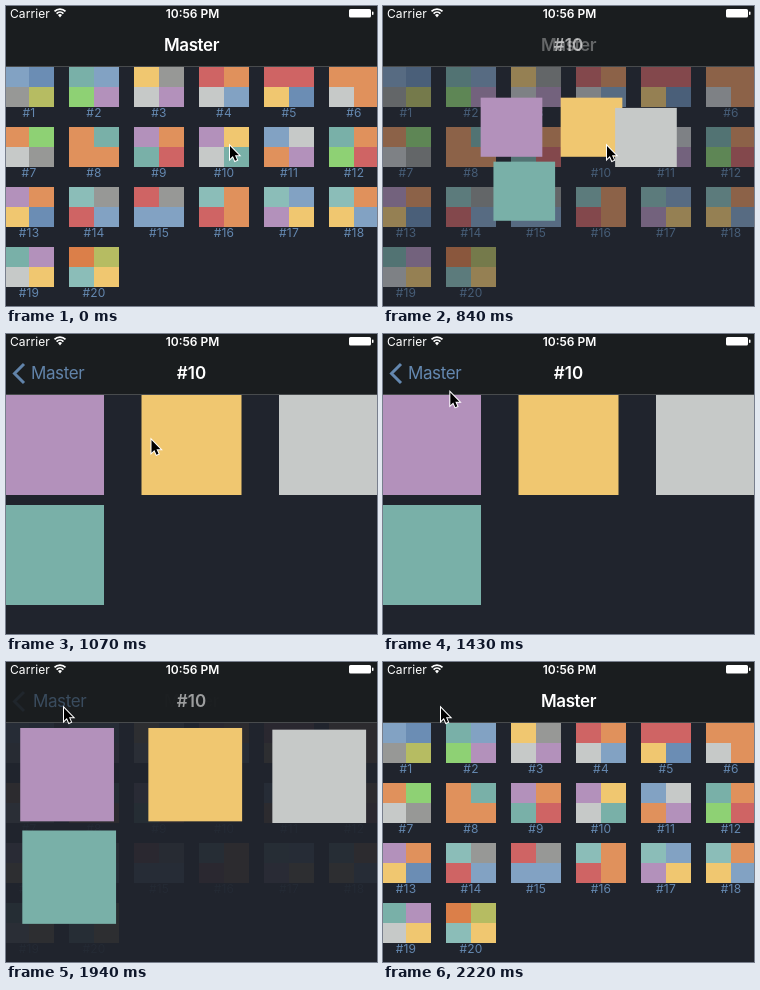
Animation of 371x300 px, one loop 2.94 s. Source, as an HTML page with a canvas:

```html
<!DOCTYPE html>
<html lang="en">
<head>
<meta charset="utf-8">
<title>Grid to detail transition</title>
<style>
html, body { margin: 0; width: 100%; height: 100%; overflow: hidden; background: #20242d; }
canvas { display: block; }
</style>
</head>
<body>
<canvas id="stage" width="371" height="300"></canvas>
<script>
const ctx = document.getElementById('stage').getContext('2d');
const FONT = 'Inter, "Liberation Sans", sans-serif';
const LINK = '#6488b0';
const LOOP = 2940, PUSH = 720, PRESS = 1710, POP = 1890, DONE = 2220;

const COLORS = {
  b: '#82a2c3', B: '#6b8db4', k: '#979896', l: '#b6bc62', t: '#79b0a8',
  T: '#8bbdb8', g: '#8ed174', p: '#b391bb', y: '#f0c770', r: '#cf6464',
  o: '#e0915c', O: '#db7f49', w: '#c6c9c8'
};
// Four tiles per cell: top left, top right, bottom left, bottom right.
const CELLS = ('bBkl tbgp ykwp rowb rryB oowo ogwk otoo potr pywt ' +
  'bwop togr poyB Tkrb rkbb Toro Tbpy Toyb tpwy OlTy').split(' ');
const OPEN = 9;

const mix = (a, b, p) => a + (b - a) * p;
const ramp = (t, from, to) => Math.min(1, Math.max(0, (t - from) / (to - from)));
const smooth = x => x * x * (3 - 2 * x);
// 0 on the grid, 1 on the detail page.
const opened = t => smooth(ramp(t, 708, 978)) - smooth(ramp(t, 1880, 2224));

function rect(color, x, y, w, h) {
  ctx.fillStyle = color;
  ctx.fillRect(x, y, w, h);
}

function text(str, x, y, { size = 12, weight = 400, color = '#fff', align = 'center', gap = 0, alpha = 1 } = {}) {
  ctx.globalAlpha = alpha;
  ctx.font = `${weight} ${size}px ${FONT}`;
  ctx.letterSpacing = gap + 'px';
  ctx.textAlign = align;
  ctx.fillStyle = color;
  ctx.fillText(str, x, y);
  ctx.globalAlpha = 1;
}

function drawGrid(alpha, moving) {
  CELLS.forEach((cell, i) => {
    const x = -2 + i % 6 * 65, y = 61 + Math.floor(i / 6) * 60;
    ctx.globalAlpha = alpha;
    if (!(moving && i === OPEN)) {
      [...cell].forEach((c, j) => rect(COLORS[c], x + j % 2 * 25, y + (j >> 1) * 20, 25, 20));
    }
    text('#' + (i + 1), x + 25, y + 50, { color: LINK, gap: 0.2, alpha });
  });
}

function drawPieces(p) {
  [...CELLS[OPEN]].forEach((c, j) => {
    const x = mix(193 + j % 2 * 25, -2 + j % 3 * 137.5, p);
    const y = mix(121 + (j >> 1) * 20, 61 + Math.floor(j / 3) * 110, p);
    rect(COLORS[c], x, y, mix(25, 100, p), mix(20, 100, p));
  });
}

function drawStatus() {
  text('Carrier', 4, 11.5, { align: 'left', gap: 0.1 });
  text('10:56 PM', 186.5, 11.5, { weight: 600 });
  ctx.strokeStyle = ctx.fillStyle = '#fff';
  ctx.lineWidth = 1.8;
  const wave = r => ctx.arc(54, 11, r, -Math.PI * 0.75, -Math.PI * 0.25);
  for (const r of [4.8, 7.8]) {
    ctx.beginPath();
    wave(r);
    ctx.stroke();
  }
  ctx.beginPath();
  ctx.moveTo(54, 11.5);
  wave(2.8);
  ctx.fill();
  ctx.beginPath();
  ctx.roundRect(343, 3, 22, 8.5, 1.5);
  ctx.roundRect(366, 5.5, 1.5, 3.5, 0.7);
  ctx.fill();
}

function drawBack(t) {
  const shown = ramp(t, 880, 1080) * (1 - 0.4 * ramp(t, PRESS - 60, PRESS));
  const x = 25 + 2 * ramp(t, POP, POP + 50);
  const alpha = shown * (1 - ramp(t, POP, POP + 180));
  text('Master', x, 45, { size: 17, gap: -0.4, color: LINK, align: 'left', alpha });
  ctx.globalAlpha = shown * (1 - ramp(t, POP, POP + 60));
  ctx.strokeStyle = LINK;
  ctx.lineWidth = 3;
  ctx.stroke(new Path2D('M18 30L8.5 39.5L18 49'));
  ctx.globalAlpha = 1;
}

function drawBar(t) {
  rect('#1a1d1f', 0, 0, 371, 60);
  rect('#484b4d', 0, 60, 371, 1);
  drawStatus();
  const title = { size: 17, weight: 600, gap: -0.4 };
  const master = 1 - ramp(t, 690, 915) + ramp(t, 1910, DONE) ** 2;
  const detail = ramp(t, PUSH, 910) * (1 - ramp(t, 1870, 2160)) ** 2;
  text('Master', 185.5, 45, { ...title, alpha: master });
  text('#10', 185.5, 45, { ...title, gap: 0, alpha: detail });
  drawBack(t);
}

function drawCursor(t) {
  const left = 1 - ramp(t, 900, PRESS);
  ctx.save();
  ctx.translate(mix(58, 224, left ** 2.7), mix(46, 140, left ** 1.9));
  const arrow = new Path2D('M0 0V12.8L2.9 10L5 14.8L7 13.9L5 9.3H9Z');
  ctx.strokeStyle = '#fff';
  ctx.lineWidth = 2;
  ctx.stroke(arrow);
  ctx.fillStyle = '#000';
  ctx.fill(arrow);
  ctx.restore();
}

function draw(t) {
  const moving = t >= PUSH && t < DONE;
  rect('#20242d', 0, 0, 371, 300);
  // The grid fades slightly behind the moving pieces.
  drawGrid(moving ? 1 - opened(t - 10) : 1, moving);
  if (moving) drawPieces(opened(t));
  drawBar(t);
  drawCursor(t);
}

const start = performance.now();
function frame() {
  draw((performance.now() - start) % LOOP);
  requestAnimationFrame(frame);
}
frame();
</script>
</body>
</html>
```
